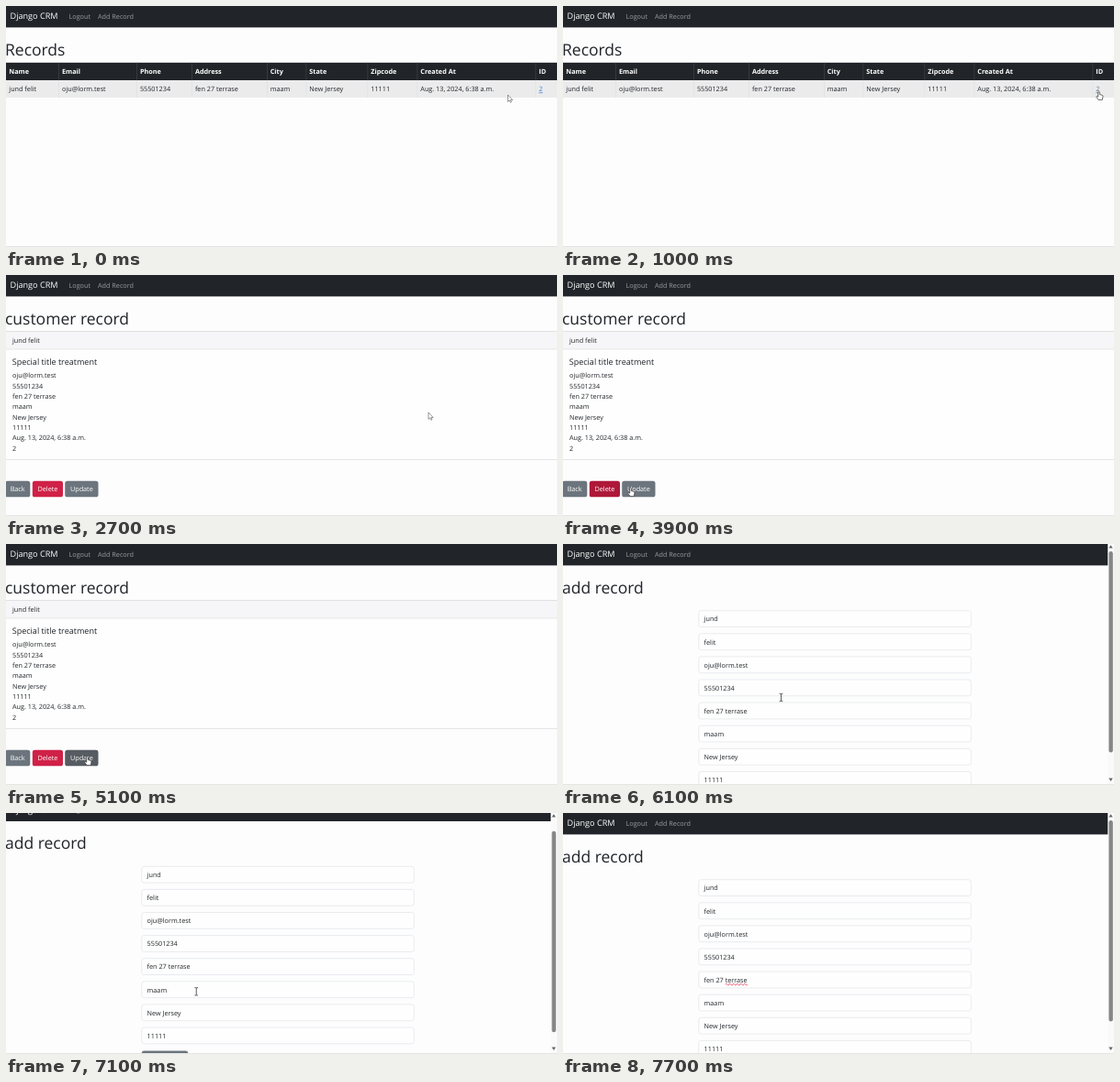
An HTML page for the animation above (8 s loop, 600x263 px).

```html
<!DOCTYPE html>
<html lang="en">
<head>
<meta charset="utf-8">
<title>Record manager</title>
<style>
html, body { margin: 0; width: 100%; height: 100%; overflow: hidden; background: #fdfdfe; }
svg { display: block; width: 100vw; height: 100vh; }
text { font: 7.25px "Open Sans", "Noto Sans", sans-serif; fill: #212529; text-rendering: geometricPrecision; }
.h1 { font-size: 17.5px; font-weight: 500; }
.brand { font-size: 9.1px; fill: #fff; }
.nav { fill: #9b9d9f; }
.th { font-weight: 700; fill: #fff; }
.title { font-size: 9.05px; font-weight: 500; }
.btn { fill: #fff; text-anchor: middle; }
.link { fill: #3878dc; text-decoration: underline; }
.status { font-size: 5.4px; fill: #444; }
</style>
</head>
<body>
<svg id="stage" viewBox="0 0 600 263" preserveAspectRatio="none"></svg>
<script>
const person = { first: 'jund', last: 'felit', email: 'oju@lorm.test', phone: '55501234',
  address: 'fen 27 terrase', city: 'maam', state: 'New Jersey', zip: '11111' };
const { first, last, ...contact } = person;
const created = 'Aug. 13, 2024, 6:38 a.m.';
const fullName = first + ' ' + last;

const text = (x, y, s, cls = '', id = '') => `<text x="${x}" y="${y}" class="${cls}" id="${id}">${s}</text>`;
const rect = (x, y, w, h, fill, more = '') => `<rect x="${x}" y="${y}" width="${w}" height="${h}" fill="${fill}" ${more}/>`;
const button = (x, y, w, label, id = '') =>
  rect(x, y, w, 17.5, '#6c757d', `rx="2.6" id="${id}"`) + text(x + w / 2, y + 11.6, label, 'btn');
const header = title => rect(0, 0, 600, 23.4, '#212529') + text(4.5, 14, 'Django CRM', 'brand') +
  text(68.5, 13.7, 'Logout', 'nav') + text(100, 13.7, 'Add Record', 'nav') + text(-1, 53.8, title, 'h1');

function listPage() {
  const heads = ['Name', 'Email', 'Phone', 'Address', 'City', 'State', 'Zipcode', 'Created At', 'ID'];
  const cells = [fullName, ...Object.values(contact), created, '2'];
  const lefts = [0, 57.7, 142.6, 202.6, 284.4, 327, 394, 448, 577];
  return header('Records') + rect(0, 61.8, 600, 19.2, '#212529') + rect(0, 81, 600, 19, '#ebebec') +
    lefts.map((x, i) =>
      (i ? rect(x - .4, 61.8, .6, 19.2, '#42484d') + rect(x - .4, 81, .6, 19, '#dcdee0') : '') +
      text(x + 3.3, 74.3, heads[i], 'th') +
      text(x + 3.3, 93.4, cells[i], i == 8 ? 'link' : '', i == 8 ? 'link' : '')).join('');
}

function detailPage() {
  const lines = [...Object.values(contact), created, '2'];
  return header('customer record') +
    rect(-3, 61.7, 606, 139.8, '#fefefe', 'stroke="#dcdcde" stroke-width=".7"') +
    rect(-3, 61.7, 606, 19.3, '#f6f5f7', 'stroke="#dcdcde" stroke-width=".7"') +
    text(7, 74.2, fullName) + text(6.7, 98, 'Special title treatment', 'title') +
    lines.map((s, i) => text(7, 112.4 + i * 11.3, s)).join('') +
    button(-1, 224.8, 27.3, 'Back') + button(28.8, 224.8, 33.2, 'Delete', 'delete') +
    button(64.2, 224.8, 36.3, 'Update', 'update');
}

function formPage() {
  let wave = 'M176.8 187.2';
  for (let i = 0; i < 12; i++) wave += `l1 ${i % 2 ? 1 : -1}l1 ${i % 2 ? -1 : 1}`;
  return '<g id="scroll">' + header('add record') +
    Object.values(person).map((s, i) => {
      const y = 72.7 + i * 25.1;
      return rect(147.8, y, 296.6, 17.8, '#fefefe', 'rx="2.6" stroke="#e1e4e8" stroke-width=".7"') +
        text(153.6, y + 11.7, s);
    }).join('') +
    `<path id="wave" d="${wave}" fill="none" stroke="#e0324c" stroke-width=".8"/>` +
    button(147.8, 274, 50.4, 'Add Record') + '</g>' +
    rect(593.2, 0, 7, 263, '#fafafa') +
    '<path d="M594.3 4.6h4.4l-2.2-3.4zM594.3 255.6h4.4l-2.2 3.4z" fill="#666"/>' +
    rect(594.4, 8, 4.4, 219.5, '#858585', 'rx="2.2" id="thumb"');
}

const pointers = {
  arrow: '<path d="M0 0V7.4L1.7 5.9L2.8 8.3L4 7.7L2.9 5.5H5.2z" fill="#fff" stroke="#555" stroke-width=".6"/>',
  hand: '<path d="M-.8 .8Q0-.6 .8 .8V3.6L3.6 4.3Q4.6 4.6 4.5 5.7L3.8 9.4H-.5L-2.8 6.2Q-2.6 5-1.6 5.5L-.8 6.2z" fill="#fff" stroke="#333" stroke-width=".7"/>',
  beam: '<path d="M-1.8-4.2H-.5L0-3.8L.5-4.2H1.8M0-3.8V3.8M-1.8 4.2H-.5L0 3.8L.5 4.2H1.8" fill="none" stroke="#333" stroke-width=".8"/>'
};
const group = (id, body) => `<g id="${id}">${body}</g>`;
const $ = id => document.getElementById(id);

$('stage').innerHTML = rect(0, 0, 600, 263, '#fdfdfe') +
  group('list', listPage()) + group('detail', detailPage()) + group('form', formPage()) +
  rect(0, 262, 600, 1, '#e4e4e5') +
  group('status', rect(-3, 252.3, 67, 14, '#d0d0d1', 'rx="2" id="statusBox"') + text(1.2, 259.6, '', 'status', 'statusText')) +
  group('pointer', Object.entries(pointers).map(([id, p]) => group(id, p)).join(''));

// time, x, y of the pointer's hot spot
const path = [[0, 546.5, 97], [500, 568, 98], [900, 583.5, 93], [1900, 583.5, 92.5], [2450, 583.5, 92.5],
  [2700, 460, 150], [3300, 105, 205], [3600, 46, 232], [3900, 73.5, 232], [4500, 80, 232], [5100, 88.5, 232],
  [5400, 163, 212], [5900, 237.5, 167.5], [6120, 237.5, 167.5], [6300, 223, 181.5], [6600, 210.5, 197],
  [7000, 210.5, 197], [7400, 190, 183], [8000, 190, 183]];

const ramp = (t, a, b) => {
  const k = Math.min(1, Math.max(0, (t - a) / (b - a)));
  return k * k * (3 - 2 * k);
};
const pulse = (t, on, off) => ramp(t, on, on + 150) - ramp(t, off, off + 150);
const within = (t, a, b) => t >= a && t < b;
const show = (id, on) => $(id).style.display = on ? '' : 'none';
const mix = (a, b, k) => `rgb(${a.map((v, i) => Math.round(v + (b[i] - v) * k))})`;

function draw(t) {
  show('list', t < 2500);
  show('detail', within(t, 2500, 5500));
  show('form', t >= 5500);

  $('link').style.fill = within(t, 850, 2500) ? '#5d7191' : '';
  $('delete').setAttribute('fill', mix([208, 33, 71], [174, 24, 57], pulse(t, 3450, 3900)));
  $('update').setAttribute('fill', mix([108, 117, 125], [86, 92, 97], pulse(t, 3900, 5150)));

  const down = ramp(t, 6120, 6290) - ramp(t, 7000, 7200);
  $('scroll').setAttribute('transform', `translate(0 ${-29.2 * down})`);
  $('thumb').setAttribute('y', 8 + 24 * down);
  show('wave', t >= 7450);

  const updating = t > 4000;
  show('status', within(t, 1200, 2500) || within(t, 4100, 4950));
  $('statusText').textContent = '127.0.0.1:8000/' + (updating ? 'update_record/2' : 'record/2');
  $('statusBox').setAttribute('width', updating ? 87 : 67);

  const i = path.findIndex(p => p[0] > t);
  const [a, b] = [path[i - 1], path[i]];
  const k = ramp(t, a[0], b[0]);
  $('pointer').setAttribute('transform', `translate(${a[1] + (b[1] - a[1]) * k} ${a[2] + (b[2] - a[2]) * k})`);
  const kind = t >= 5600 ? 'beam' : within(t, 850, 2500) || within(t, 3450, 5150) ? 'hand' : 'arrow';
  for (const id in pointers) show(id, id == kind);
  show('pointer', t < 7550);
}

const start = performance.now();
function tick() {
  draw((performance.now() - start) % 8000);
  requestAnimationFrame(tick);
}
tick();
</script>
</body>
</html>
```
